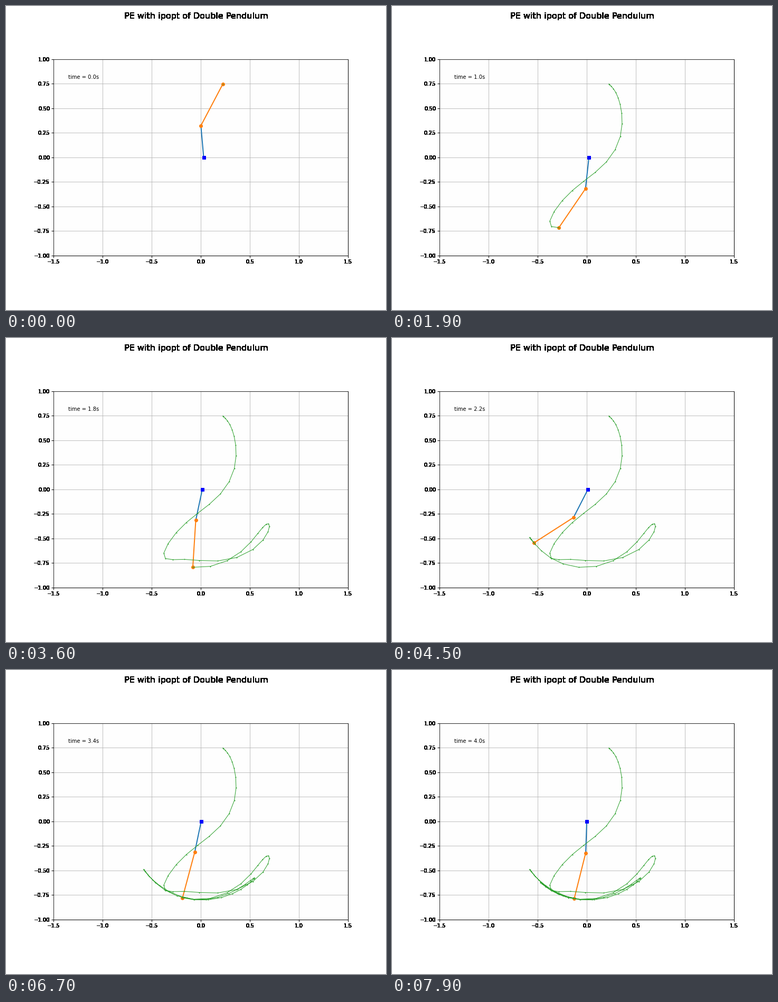
Recreate the animation shown at these times as a matplotlib script. Size 720 by 576 pixels, loop 8 s.

```python
import numpy as np
import matplotlib.pyplot as plt
from matplotlib.animation import FuncAnimation

plt.rcParams["font.family"] = "DejaVu Sans"

N = 80
DT = 0.05
L1, L2 = 0.323, 0.48

# Key poses, one every KEY_GAP steps: arm angles in degrees from straight down.
KEY_GAP = 4
ARM1 = [185, 192, 206.5, 224.5, 283.5, 373.5, 407.5, 398.7, 372, 348, 333.5,
        330.3, 347.5, 373, 389.8, 383.7, 361, 345, 338, 345, 363]
ARM2 = [152.2, 135.8, 96, 37, -5, -33.5, 34.5, 78, 62.6, -3.6, -55.7,
        -61.5, -33.6, 15.3, 46.2, 50, 19.7, -25.4, -47.6, -36.6, -5.5]


def swing(keys):
    """Cubic spline through the key angles, starting at rest; radians per step."""
    y = np.radians(keys)
    n = len(y)
    a = 4 * np.eye(n) + np.eye(n, k=1) + np.eye(n, k=-1)
    a[0, :2] = 1, 0
    a[-1, -1] = 2
    rise = np.zeros(n)
    rise[1:-1] = 3 * (y[2:] - y[:-2])
    rise[-1] = 3 * (y[-1] - y[-2])
    m = np.linalg.solve(a, rise)

    k, u = np.divmod(np.arange(N) / KEY_GAP, 1)
    k = k.astype(int)
    return ((1 + 2 * u) * (1 - u) ** 2 * y[k] + u * (1 - u) ** 2 * m[k]
            + u ** 2 * (3 - 2 * u) * y[k + 1] + u ** 2 * (u - 1) * m[k + 1])


a1, a2 = swing(ARM1), swing(ARM2)
cart = 0.0296 * (1 - np.arange(N) / N)
jx, jy = cart + L1 * np.sin(a1), -L1 * np.cos(a1)
tx, ty = jx + L2 * np.sin(a2), jy - L2 * np.cos(a2)


def harden(img, dpi):
    """Turn every touched pixel solid black, so lettering has hard edges."""
    out = np.zeros_like(img)
    out[..., 3] = img[..., 3] > 0
    return out, 0, 0


fig = plt.figure(figsize=(10, 8), dpi=72, facecolor="white")
title = fig.text(0.5, 0.98, "PE with ipopt of Double Pendulum",
                 size=16, ha="center", va="top")

ax = fig.add_axes([0.125, 0.125, 0.775, 0.755], facecolor="#fefefe")
ax.set(xlim=(-1.5, 1.5), ylim=(-1, 1), aspect="equal",
       xticks=np.arange(-1.5, 1.6, 0.5), yticks=np.arange(-1, 1.1, 0.25))
ax.tick_params(length=4, pad=3, width=1)
ax.grid(color="#b0b0b0", lw=0.8)
ax.spines[["right", "bottom"]].set_linewidth(1)
for label in [title, *ax.get_xticklabels(), *ax.get_yticklabels()]:
    label.set_agg_filter(harden)

arm1, = ax.plot([], [], "-", color="C0", lw=2)
pivot, = ax.plot([], [], "bs", ms=6)
arm2, = ax.plot([], [], "o-", color="C1", lw=2, ms=6)
trace, = ax.plot([], [], ".-", color="C2", lw=1, ms=2)
clock = ax.text(0.05, 0.9, "", size=10, transform=ax.transAxes)


def update(i):
    arm1.set_data([cart[i], jx[i]], [0, jy[i]])
    pivot.set_data([cart[i]], [0])
    arm2.set_data([jx[i], tx[i]], [jy[i], ty[i]])
    trace.set_data(tx[:i + 1], ty[:i + 1])
    clock.set_text(f"time = {i * DT:.1f}s")
    return arm1, pivot, arm2, trace, clock


anim = FuncAnimation(fig, update, frames=N, interval=100,
                     repeat=True, repeat_delay=0, blit=False)
plt.show()
```
